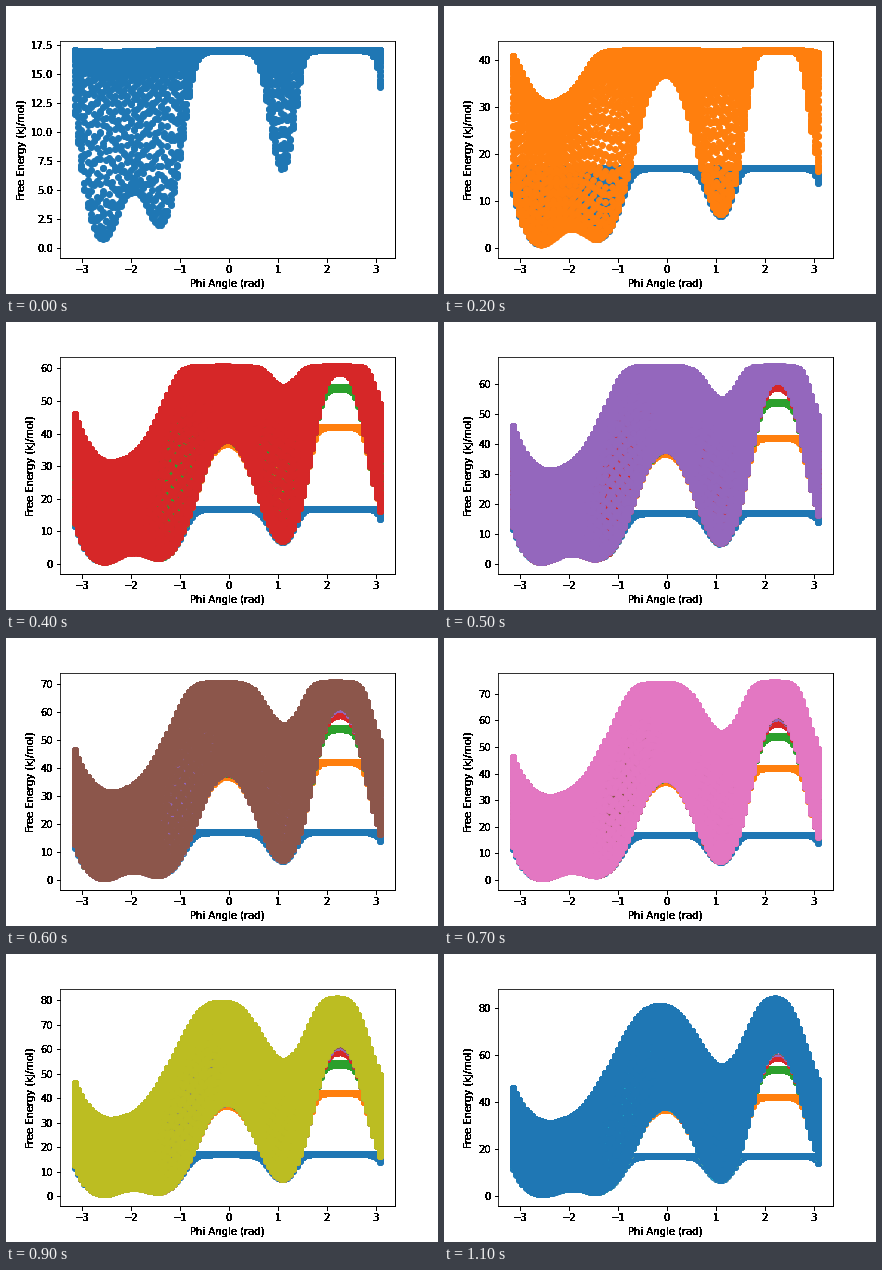
Animation of 432 by 288 pixels, one loop 1200 ms. Source, as a matplotlib script:

```python
import numpy as np
import matplotlib.pyplot as plt
from matplotlib.animation import FuncAnimation

N = 100          # grid points per angle
SOFTNESS = 4     # kJ/mol over which the filling level rounds off
LEVELS = [17.04, 42.06, 54.2, 60.6, 65.9, 70.4, 74.2, 77.8, 80.7, 82.5, 84.1]

phi = np.linspace(-np.pi, np.pi, N, endpoint=False)
psi = phi[:, None]


def bell(center, width):
    """Periodic, slightly flat-topped bump in phi."""
    d = (phi - center + np.pi) % (2 * np.pi) - np.pi
    return np.exp(-np.abs(d / width) ** 2.3)


# Fully explored landscape: highest and lowest energy over psi
CEILING = 30 + 51 * bell(-.15, 1.2) + 54 * bell(2.22, .85)
FLOOR = 38 * bell(-.04, .8) + 62.5 * bell(2.26, .72)


def fill(energy, level):
    """Limit energy smoothly so that the ceiling peaks at the level."""
    rest = np.exp(-level / SOFTNESS) - np.exp(-CEILING.max() / SOFTNESS)
    return -SOFTNESS * np.log(np.exp(-energy / SOFTNESS) + max(rest, 0))


def surface(k):
    """Free energy on the (psi, phi) grid at stage k."""
    s = k + 1
    ridge = (3 + 2 / s) * bell(-1.95, .42)
    low = np.maximum(fill(FLOOR + ridge, LEVELS[k]), 0)
    high = np.maximum(fill(CEILING, LEVELS[k]), low)

    early = 1 / s ** 2
    slopes = 4.5 * bell(-.7 - .8 / s, .75) + 3 * bell(.95, .4)
    sharp = 1 + 11 * early + (1 - early) * slopes
    a = psi - (.1 + .25 / s) * phi - .21 * k
    a = a + .12 * np.sin(a) ** 2
    base = np.exp(-2 * sharp)
    well = (np.exp(sharp * (np.cos(a) - 1)) - base) / (1 - base)
    return high - (high - low) * well


def harden(img, dpi):
    """Solid black wherever there is ink."""
    out = np.zeros(img.shape)
    out[..., 3] = img[..., 3] > .1
    return out, 0, 0


fig, ax = plt.subplots(figsize=(6, 4), dpi=72)
fig.subplots_adjust(left=.125, right=.9, bottom=.125, top=.88)
ax.set_xlabel("Phi Angle (rad)")
ax.set_ylabel("Free Energy (kJ/mol)")
for part in (ax.xaxis, ax.yaxis, ax.spines["right"], ax.spines["bottom"]):
    part.set_agg_filter(harden)

grid_x = np.tile(phi, N)
clouds = [ax.scatter(grid_x, surface(k).ravel(), color=f"C{k % 10}")
          for k in range(len(LEVELS))]
pad = .05 * np.ptp(phi)
ax.set_xlim(phi[0] - pad, phi[-1] + pad)


def update(frame):
    stage = max(frame - 1, 0)   # the first stage is held twice as long
    for k, cloud in enumerate(clouds):
        cloud.set_visible(k <= stage)
    ax.set_ylim(-.05 * LEVELS[stage], 1.05 * LEVELS[stage])
    return clouds


anim = FuncAnimation(fig, update, frames=len(LEVELS) + 1, interval=100,
                     repeat=True, repeat_delay=0, blit=False)
plt.show()
```
